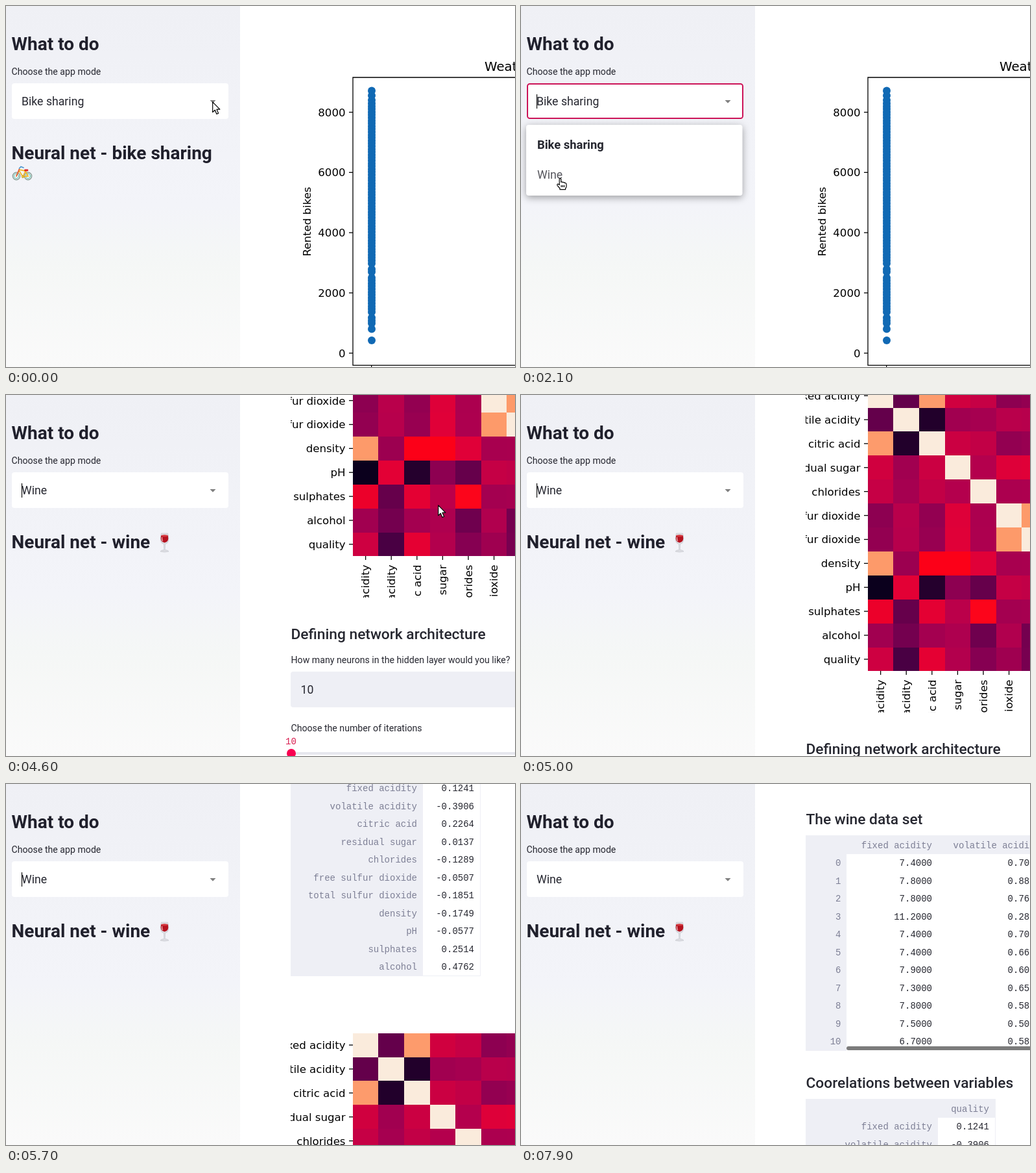
Recreate the animation shown at these times as an HTML page. Size 785 px wide and 556 px high, loop 8000 ms.

```html
<!DOCTYPE html>
<html lang="en">
<head>
<meta charset="utf-8">
<title>App mode demo</title>
<style>
html, body { margin: 0; width: 100%; height: 100%; overflow: hidden; background: #fff; }
svg { display: block; width: 785px; height: 556px; }
text { font: 14.15px Roboto, sans-serif; fill: #262730; white-space: pre; }
.h1 { font-size: 28px; font-weight: 700; fill: #20202c; }
.h2 { font-size: 22.75px; font-weight: 500; fill: #262730; }
.field { font-size: 17.7px; }
.mono { font: 14px "Liberation Mono", monospace; }
.dim { fill: #7d7f95; }
.plot { font: 16.6px "DejaVu Sans", sans-serif; fill: #000; }
.end { text-anchor: end; }
.axis { fill: none; stroke: #000; stroke-width: 1.3; }
#menu rect { filter: drop-shadow(0 3px 6px rgba(0,0,0,.36)); }
</style>
</head>
<body>
<svg viewBox="0 0 785 556">
  <defs>
    <linearGradient id="shade" x2="0" y2="1">
      <stop stop-color="#eff0f5"/>
      <stop offset=".55" stop-color="#f3f4f9"/>
      <stop offset=".72" stop-color="#f5f7f6"/>
      <stop offset="1" stop-color="#fafafa"/>
    </linearGradient>
    <clipPath id="dataClip"><rect x="439" y="79" width="400" height="332"/></clipPath>
    <clipPath id="heatClip"><rect x="439" y="880" width="400" height="531"/></clipPath>
  </defs>

  <g id="bikePage"></g>
  <g id="winePage"></g>

  <rect width="361" height="556" fill="url(#shade)"/>
  <text class="h1" x="8.5" y="68">What to do</text>
  <text x="8.5" y="106">Choose the app mode</text>
  <rect x="9" y="119" width="334" height="55" rx="4" fill="#fff"/>
  <rect id="ring" x="10" y="120" width="332" height="53" rx="3.5" fill="none" stroke="#cc1458" stroke-width="2"/>
  <text id="choice" class="field" x="24" y="153"></text>
  <path id="caret" d="M24.5 136V158" stroke="#111" stroke-width="1.2"/>
  <path d="M314.5 145H323.5L319 149.8Z" fill="#808080"/>

  <text id="title" class="h1" x="8.5" y="236"></text>
  <g id="bikeIcon" fill="none" stroke-linecap="round">
    <g stroke="#8fa39c" stroke-width="1.6"><circle cx="16" cy="262" r="5.6"/><circle cx="34" cy="262" r="5.6"/></g>
    <g stroke="#55bfa6" stroke-width=".9"><circle cx="16" cy="262" r="3.6"/><circle cx="34" cy="262" r="3.6"/></g>
    <path d="M16 262L20.5 252L30 254L26 263L20.5 254M26 263L34 262L30 254" stroke="#f2b92d" stroke-width="1.8"/>
    <path d="M16 262L20.5 251" stroke="#e0503a" stroke-width="1.5"/>
    <path d="M20.5 250L23 247.5L27 249" stroke="#4a94cf" stroke-width="1.7"/>
    <path d="M29.5 253H33" stroke="#e02424" stroke-width="2.8"/>
    <circle cx="26" cy="263" r="1.7" fill="#f4d23c" stroke="#b58d24" stroke-width=".7"/>
  </g>
  <g id="wineIcon">
    <path d="M239.5 213Q235.5 228 243.4 229.5L243.8 238.5Q238.5 239 238 241Q244.5 243.2 251 241Q250.5 239 245.2 238.5L245.6 229.5Q253.5 228 249.5 213Z" fill="#dcdde2" stroke="#c3c5cb" stroke-width=".6"/>
    <path d="M239.2 216.5H249.8Q252 226.5 244.5 227.5Q237 226.5 239.2 216.5Z" fill="#b5121f"/>
    <ellipse cx="244.5" cy="216.8" rx="5.1" ry="1.5" fill="#d63a40"/>
    <path d="M240.6 219Q240 223 241.6 225" fill="none" stroke="#f3c3c5" stroke-width="1.1"/>
  </g>

  <g id="menu">
    <rect x="8" y="183" width="333.5" height="109" rx="4" fill="#fff"/>
    <text class="field" x="25" y="219.5" style="font-weight:700;font-size:18.4px">Bike sharing</text>
    <text class="field" x="25" y="266" fill-opacity=".78">Wine</text>
  </g>

  <g id="cursor" stroke="#000" fill="#fff" stroke-width="1.2" stroke-linejoin="round">
    <path id="arrow" d="M.7 .9V16.6L4.3 13.2L6.9 19.4L9.6 18.2L7 12.2H11.8Z"/>
    <path id="hand" transform="translate(-4 1)" d="M4.2 9.2V2Q4.2 .7 5.5 .7T6.8 2V6.2Q8.4 5.3 9.4 6.7Q11.2 6 12 7.4Q15 7 15 10V13Q14.6 15 13.6 16V17.7H5V16L1.2 11.6Q.2 10 1.4 9.2Q2.6 8.7 4.2 10.6ZM7.2 11V14M9.4 11V14M11.6 11V14"/>
  </g>
</svg>
<script>
const $ = id => document.getElementById(id);
const text = (x, y, s, cls = "", extra = "") => `<text class="${cls}" x="${x}" y="${y}" ${extra}>${s}</text>`;
const rect = (x, y, w, h, fill, extra = "") => `<rect x="${x}" y="${y}" width="${w}" height="${h}" fill="${fill}" ${extra}/>`;
const line = d => `<path class="axis" d="${d}"/>`;
const PALE = "#eeeff5";

// Scatter plot: one dense column of dots with a few gaps
function bikePage() {
  const gaps = [401.5, 414, 476, 493], ys = [130.5, 138, 145, 515];
  for (let y = 150; y < 500; y += 4.4)
    if (gaps.every(g => Math.abs(g - y) > 2.5)) ys.push(y);
  let out = ys.map(y => `<circle cx="564" cy="${y}" r="6" fill="#1069b4"/>`).join("");
  for (let i = 0; i < 5; i++) {
    const y = 534.6 - i * 92.75;
    out += line(`M529 ${y}H535`) + text(523.5, y + 6, i * 2000, "plot end");
  }
  return out + line("M800 110H535V553.3H800M563.7 553V560") +
    text(0, 0, "Rented bikes", "plot", 'text-anchor="middle" transform="translate(470 332) rotate(-90)"') +
    text(738, 100, "Weather", "plot", 'style="font-size:19.8px"');
}

// Wine data
const names = ["fixed acidity", "volatile acidity", "citric acid", "residual sugar", "chlorides",
  "free sulfur dioxide", "total sulfur dioxide", "density", "pH", "sulphates", "alcohol", "quality"];
const fixed = [7.4, 7.8, 7.8, 11.2, 7.4, 7.4, 7.9, 7.3, 7.8, 7.5, 6.7];
const volatile = [.7, .88, .76, .28, .7, .66, .6, .65, .58, .5, .58];
const quality = [.1241, -.3906, .2264, .0137, -.1289, -.0507, -.1851, -.1749, -.0577, .2514, .4762];

// Correlation model: product of acidity loadings, apart from a few direct links
const acidity = [.9, -.3, .75, .15, .1, -.12, -.1, .2, -.72, .3, -.05];
const links = {
  "2,1": -.55, "5,3": .19, "6,3": .2, "6,5": .67, "7,0": .67, "7,2": .36, "7,3": .36,
  "7,4": .2, "8,4": -.26, "9,1": -.26, "9,4": .37, "10,1": -.2, "10,4": -.22, "10,6": -.2
};

function corr(r, c) {
  if (r === c) return 1;
  const hi = Math.max(r, c), lo = Math.min(r, c);
  if (hi === 11) return quality[lo];
  return links[[hi, lo]] ?? acidity[hi] * acidity[lo];
}

const scale = [[-.68, 3, 0, 24], [-.39, 73, 0, 67], [-.15, 127, 0, 82], [0, 176, 0, 79],
  [.2, 224, 0, 56], [.36, 252, 0, 24], [.67, 253, 154, 106], [1, 250, 235, 220]];

function heat(v) {
  const i = Math.max(1, scale.findIndex(s => s[0] >= v));
  const a = scale[i - 1], b = scale[i];
  const k = Math.max(0, (v - a[0]) / (b[0] - a[0]));
  return `rgb(${[1, 2, 3].map(c => Math.round(a[c] + (b[c] - a[c]) * k))})`;
}

function dataTable() {
  let out = rect(439, 79, 360, 332, PALE) + rect(502, 108, 300, 303, "#fff") +
    text(634, 99, names[0], "mono dim end") + text(801, 99, names[1], "mono dim end");
  fixed.forEach((v, i) => {
    const y = 126 + i * 27.5;
    out += text(493.5, y, i, "mono dim end") + text(634, y, v.toFixed(4), "mono end") +
      text(801, y, volatile[i].toFixed(4), "mono end");
  });
  out += rect(502, 404, 400, 6, "#7c7c7c", 'rx="3"');
  return `<g clip-path="url(#dataClip)">${out}</g>`;
}

function qualityTable() {
  let out = rect(439, 485, 293, 332, PALE) + rect(643, 514, 88, 302, "#fff") +
    text(722, 505, "quality", "mono dim end");
  quality.forEach((v, i) => {
    const y = 532 + i * 27.5;
    out += text(634, y, names[i], "mono dim end") + text(722, y, v.toFixed(4), "mono end");
  });
  return out;
}

function heatmap() {
  const left = 534.8, top = 904.6, w = 39.6, h = 36.9;
  let out = "";
  names.forEach((name, r) => {
    const y = top + r * h, mid = y + h / 2;
    for (let c = 0; c < 7; c++)
      out += rect(left + c * w, y, w, h, heat(corr(r, c)), 'shape-rendering="crispEdges"');
    out += line(`M529 ${mid}H535`) + text(523.5, mid + 6, name, "plot end");
  });
  for (let c = 0; c < 7; c++) {
    const x = left + (c + .5) * w;
    out += line(`M${x} 1347V1353`) +
      text(0, 0, names[c], "plot end", `transform="translate(${x + 5.8} 1360.5) rotate(-90)"`);
  }
  return `<g clip-path="url(#heatClip)">${out}</g>`;
}

const network = () =>
  text(439.5, 1475, "Defining network architecture", "h2") +
  text(439.5, 1511.5, "How many neurons in the hidden layer would you like?") +
  rect(439, 1525, 400, 55, PALE, 'rx="4"') + text(454.5, 1559, "10", "field") +
  text(439.5, 1616.5, "Choose the number of iterations") +
  text(431, 1637, "10", "mono", 'style="fill:#d81e50"') +
  rect(439, 1649, 400, 4, "#e6e7ee") + '<circle cx="440" cy="1651" r="7" fill="#f90050"/>';

$("bikePage").innerHTML = bikePage();
$("winePage").innerHTML = text(439.5, 62, "The wine data set", "h2") + dataTable() +
  text(439.5, 468, "Coorelations between variables", "h2") + qualityTable() + heatmap() + network();

// Eased moves: [start, end, target...]
const flicks = [[2700, 3200, 1099], [4800, 5100, 860], [5400, 5700, 521],
  [5900, 6100, 300], [6200, 6300, 140], [6500, 6600, 0]];
const moves = [[1400, 1800, 66, 264], [1900, 2100, 59, 264], [2300, 2400, 557, 514],
  [2500, 3200, 485, 263], [3200, 3300, 498, 267], [3500, 3800, 648, 34], [3900, 4100, 700, -30],
  [4200, 4300, 664, 177], [4300, 4400, 666, 169], [4600, 4700, 800, 169],
  [7300, 7400, 688, 187], [7400, 7900, 640, -30]];

const ramp = (t, a, b) => Math.max(0, Math.min(1, (t - a) / (b - a)));
const ease = k => k * k * (3 - 2 * k);
const follow = (first, steps, t) => steps.reduce((pos, [a, b, ...to]) =>
  pos.map((p, i) => p + (to[i] - p) * ease(ramp(t, a, b))), first);
const show = (id, on) => { $(id).style.display = on ? "" : "none"; };

function draw(t) {
  const wine = t >= 2600, picked = t >= 2300;
  const hand = t >= 500 && t < 2400;
  const open = ramp(t, 800, 1100) - ramp(t, 2200, 2400);
  const blink = t >= 900 && (t - 900) % 1200 < 600;

  show("bikePage", t < 2800);
  show("winePage", t >= 2800);
  $("winePage").setAttribute("transform", `translate(0 ${-Math.round(follow([600], flicks, t)[0])})`);
  $("choice").textContent = picked ? "Wine" : "Bike sharing";
  $("title").textContent = wine ? "Neural net - wine" : "Neural net - bike sharing";
  show("bikeIcon", !wine);
  show("wineIcon", wine);
  show("ring", t >= 900 && t < 2400);
  show("caret", blink);
  show("menu", open > 0);
  $("menu").style.opacity = open;
  show("arrow", !hand);
  show("hand", hand);
  $("cursor").setAttribute("transform", `translate(${follow([318, 147], moves, t)})`);
}

// The picture changes ten times a second
const start = performance.now();
function tick() {
  const t = (performance.now() - start) % 8000;
  draw(Math.floor(t / 100) * 100);
  requestAnimationFrame(tick);
}
tick();
</script>
</body>
</html>
```
